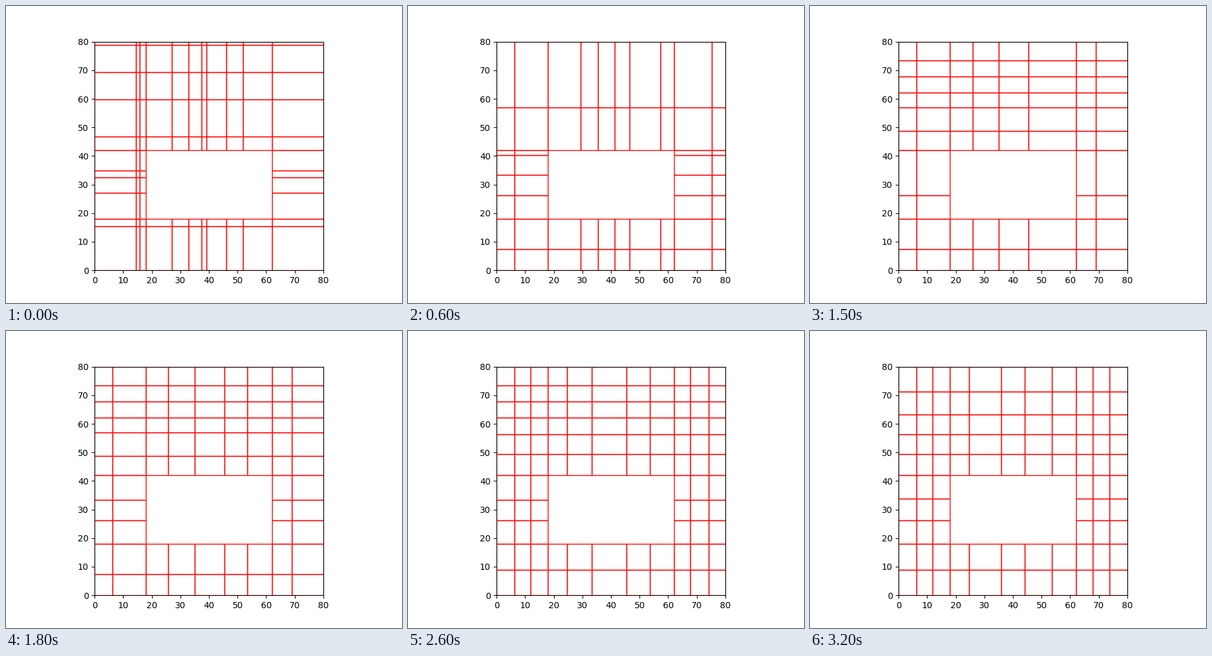
A matplotlib script that plays this animation: 640x480 px, repeating every 3.3 s.

```python
from math import ceil

import matplotlib.pyplot as plt
from matplotlib.animation import FuncAnimation
from matplotlib.patches import Rectangle

SIZE = 80
HOLE = ((18, 62), (18, 42))
FRAMES = 33
GAP = 4.5  # a new line clears away older lines closer than this

# Parent grids of the early search: step, vertical lines, horizontal lines.
PARENTS = [
    (0, [14.5, 15.8, 27, 32.9, 37.4, 39.1, 46.1, 51.9],
     [15.4, 27.1, 32.5, 34.9, 46.8, 59.7, 69.3, 78.8]),
    (3, [6.7, 11, 27.9, 35.5, 41.3, 46.5, 57.3, 75.3],
     [7.4, 11.6, 18.2, 25.6, 32.3, 33.4, 40.3, 57]),
    (10, [6.2, 29.4, 35, 41.3, 45.4, 69],
     [7.4, 26.2, 33.4, 48.3, 62.2, 67.8, 73.4]),
]
# Lines born during the refinement, spread evenly up to the given step.
BIRTHS = [
    (15, [26, 45.4], [48.75, 57, 29.7, 26.2]),
    (21, [25.8, 53.5, 74.2], [33.4]),
    (26, [11.9, 24.7, 33.3, 53.6, 67.8], [56.3, 49.4, 8.9]),
    (32, [35.9, 44.1, 68, 73.75], [71.3, 63.2, 33.8]),
]


def progress(step, start, end):
    return min(max((step - start) / (end - start), 0), 1)


def crossover(old, new, t):
    """Child with the new lines before the cut and the old ones after it."""
    cut = SIZE * t
    return [v for v in new if v <= cut] + [v for v in old if v > cut]


def grid_lines(step, axis):
    start, *first = PARENTS[0]
    lines = first[axis]
    for end, *parent in PARENTS[1:]:
        if step > start:
            lines = crossover(lines, parent[axis], progress(step, start, end))
        start = end
    for end, *born in BIRTHS:
        count = ceil(len(born[axis]) * progress(step, start, end))
        for new in born[axis][:count]:
            lines = [v for v in lines if abs(v - new) > GAP] + [new]
        start = end
    return lines


def spans(step, axis):
    edges = sorted({0, SIZE, *HOLE[axis], *grid_lines(step, axis)})
    return list(zip(edges, edges[1:]))


def in_hole(span, axis):
    low, high = HOLE[axis]
    return low <= span[0] and span[1] <= high


fig, ax = plt.subplots(figsize=(6.4, 4.8), dpi=100)
ax.set_aspect("equal")
ticks = range(0, SIZE + 1, 10)
ax.set(xlim=(0, SIZE), ylim=(0, SIZE), xticks=ticks, yticks=ticks)


def draw(step):
    for patch in list(ax.patches):
        patch.remove()
    rows = spans(step, 1)
    for x in spans(step, 0):
        for y in rows:
            if not (in_hole(x, 0) and in_hole(y, 1)):
                ax.add_patch(Rectangle((x[0], y[0]), x[1] - x[0], y[1] - y[0],
                                       fill=False, edgecolor="red", linewidth=1))
    return ax.patches


anim = FuncAnimation(fig, draw, frames=FRAMES, init_func=lambda: [],
                     interval=100, repeat=True, repeat_delay=0, blit=False)
plt.show()
```
